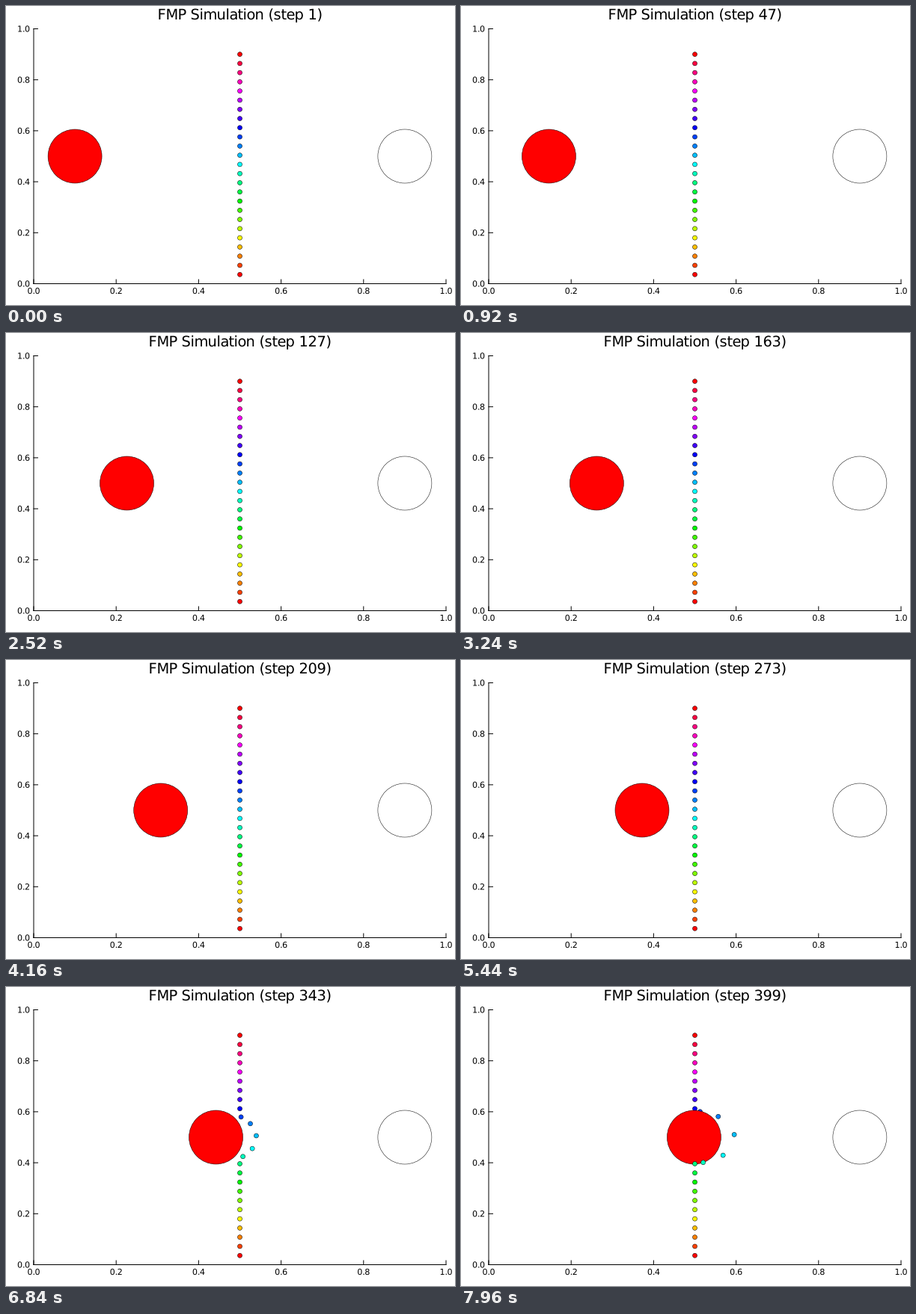
A matplotlib script for the animation above (8000 ms loop, 600 by 400 pixels).

```python
import colorsys
from functools import lru_cache
import numpy as np
import matplotlib.pyplot as plt
from matplotlib.animation import FuncAnimation
from matplotlib.patches import Ellipse, PathPatch
from matplotlib.path import Path
from matplotlib.textpath import TextPath
from matplotlib.transforms import Affine2D, IdentityTransform

W, H, DPI = 600, 400, 100
FRAMES, INTERVAL = 200, 40
PT = 72 / DPI                                # points per pixel
LEFT, RIGHT, TOP, BOTTOM = 37, 588, 30.5, 371.5
SPAN_X, SPAN_Y = RIGHT - LEFT, BOTTOM - TOP
TITLE_SIZE, TICK_SIZE = 14 / PT, 8 / PT      # pixels
FONT = {"family": "DejaVu Sans"}

fig = plt.figure(figsize=(W / DPI, H / DPI), dpi=DPI, facecolor="white")
ax = fig.add_axes([LEFT / W, 1 - BOTTOM / H, SPAN_X / W, SPAN_Y / H])
ax.set(xlim=(0, 1), ylim=(0, 1))
ax.axis("off")


@lru_cache(maxsize=None)
def glyph(char, size):
    """Outline of a character and its advance in whole pixels."""
    def right_edge(s):
        return TextPath((0, 0), s, size=size, prop=FONT).get_extents().x1
    advance = int(right_edge(char + "|") - right_edge("|"))
    return TextPath((0, 0), char, size=size, prop=FONT), advance


def text_path(text, x, baseline, size, align=0.5):
    """Text set with whole-pixel advances, in pixels from the top left."""
    glyphs = [glyph(c, size) for c in text]
    pen = x - align * sum(advance for _, advance in glyphs)
    parts = []
    for outline, advance in glyphs:
        if len(outline.vertices):
            parts.append(outline.transformed(Affine2D().translate(pen, H - baseline)))
        pen += advance
    return Path.make_compound_path(*parts)


def add_text(path):
    patch = PathPatch(path, facecolor="black", linewidth=0, snap=False,
                      transform=IdentityTransform())
    return fig.add_artist(patch)


def add_line(x0, y0, x1, y1):
    fig.add_artist(plt.Line2D([x0, x1], [H - y0, H - y1], color="black", linewidth=PT,
                              snap=False, transform=IdentityTransform()))


add_line(LEFT, BOTTOM, RIGHT, BOTTOM)
add_line(LEFT, BOTTOM, LEFT, TOP)
for t in np.linspace(0, 1, 6):
    px, py = LEFT + t * SPAN_X, BOTTOM - t * SPAN_Y
    add_line(px, BOTTOM, px, BOTTOM - 5.5)
    add_line(LEFT, py, LEFT + 5.5, py)
    add_text(text_path(f"{t:.1f}", px, 385, TICK_SIZE))
    add_text(text_path(f"{t:.1f}", 32, py + 4, TICK_SIZE, align=1))

title = add_text(text_path("FMP", W / 2, 18, TITLE_SIZE))

# A column of small agents, coloured once around the hue circle
N = 25
home_y = 0.036 * np.arange(1, N + 1)
REACH = 0.1                                  # distance at which the disc pushes


def disc(x, y, diameter, color, z):
    return ax.add_patch(Ellipse((x, y), diameter / SPAN_X, diameter / SPAN_Y,
                                facecolor=color, edgecolor="black",
                                linewidth=0.5 * PT, zorder=z, clip_on=False))


disc(0.9, 0.5, 72, "none", 2)
mover = disc(0.1, 0.5, 72, "red", 4)
dots = [disc(0.5, y, 6, colorsys.hsv_to_rgb(i / (N - 1) % 1, 1, 1), 5 if y < 0.45 else 3)
        for i, y in enumerate(home_y)]


def pushed(y, cx):
    """Agents slide around the rim of the disc once it touches them."""
    s = (y - 0.5) / REACH
    if abs(s) >= 1:
        return 0.5, y
    start = np.arcsin(s)
    travel = cx - (0.5 - REACH * np.cos(start))
    if travel <= 0:
        return 0.5, y
    angle = 2 * np.arctan(np.tan(start / 2) * np.exp(travel / REACH))
    r = 0.098 + 0.0035 * np.sin(angle) ** 2
    return max(0.5, cx + r * np.cos(angle)), 0.5 + r * np.sin(angle)


def update(k):
    cx = 0.1 + 0.002 * k
    title.set_path(text_path(f"FMP Simulation (step {2 * k + 1})", 312.5, 18, TITLE_SIZE))
    mover.set_center((cx, 0.5))
    for dot, y in zip(dots, home_y):
        dot.set_center(pushed(y, cx))
    return [title, mover, *dots]


anim = FuncAnimation(fig, update, frames=FRAMES, interval=INTERVAL,
                     repeat=True, repeat_delay=0, blit=False)
plt.show()
```
